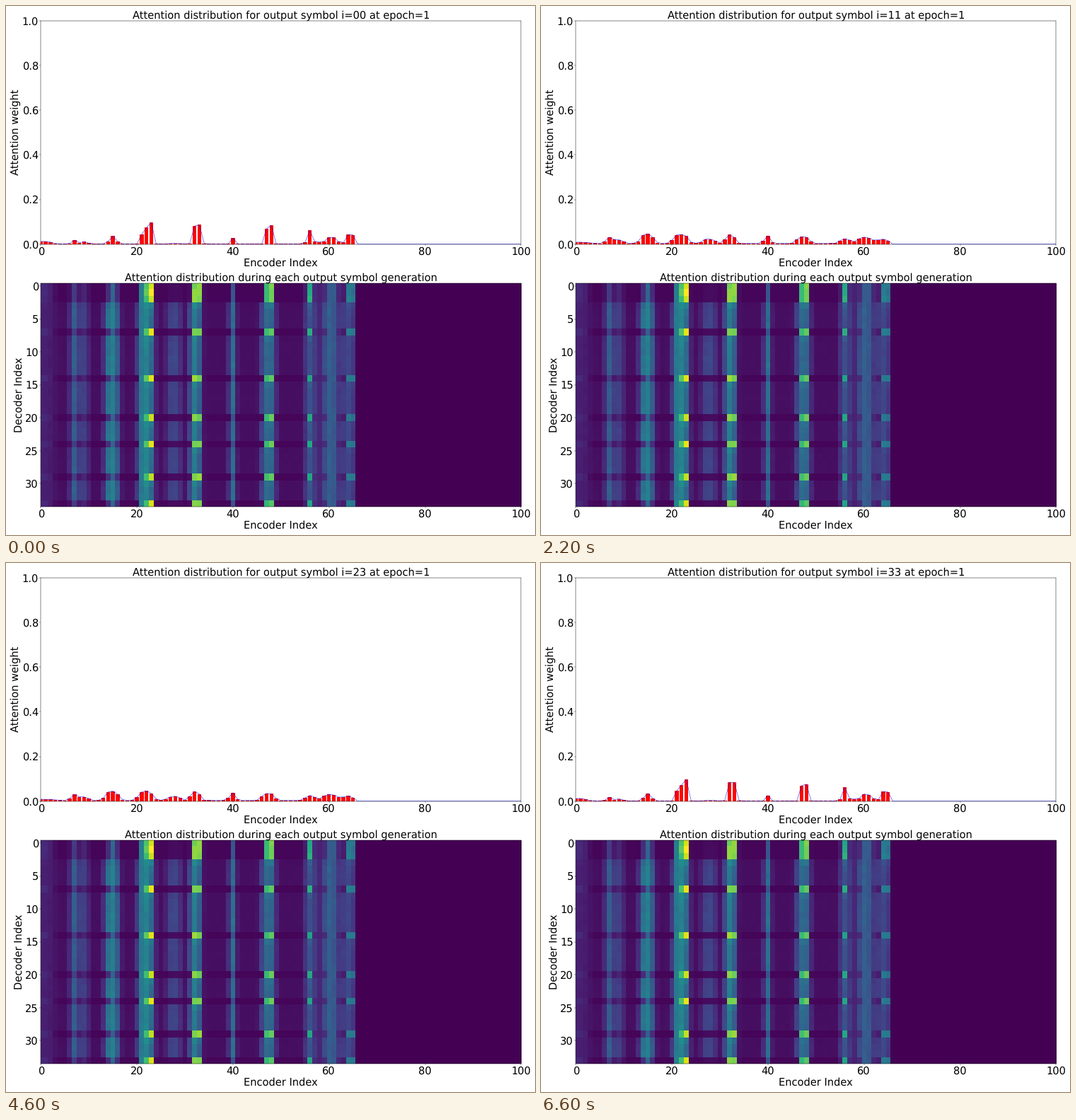
These frames come from a looping animation (748 by 748 pixels, 6800 ms). A matplotlib script:

```python
import numpy as np
import matplotlib.pyplot as plt
from matplotlib.animation import FuncAnimation

SIZE, DPI = 748, 34
ROWS, COLS, INPUT_LEN = 34, 101, 66
SHARP_ROWS = (0, 1, 2, 7, 14, 20, 24, 29, 33)

# Attention bumps: centre, height in thousandths, half width.
SMOOTH_BUMPS = [(0, 5, 3), (7, 27, 0.95), (9, 16, 1.1), (14.8, 41, 1.6),
                (21.8, 42, 1.75), (27.7, 18, 1.6), (32.1, 38, 1.25),
                (39.9, 34, 0.85), (47.3, 31, 1.55), (56, 20, 1.2),
                (60, 16, 1.4), (62, 13, 4.5), (64, 6, 1)]
SHARP_BUMPS = [(0.3, 11, 2.3), (7, 17, 0.8), (9, 9, 1), (15, 32, 1),
               (21.8, 72, 1), (23, 83, 0.6), (28, 2, 1.5), (32.5, 96, 0.95),
               (40, 25, 0.6), (47.55, 90, 0.85), (56, 60, 0.75),
               (60, 10, 3.5), (60.5, 20, 1.1), (64.5, 45, 0.95)]

plt.rcParams.update({
    "font.family": "DejaVu Sans",
    "font.size": 30.9,
    "axes.titlesize": 30.9,
    "axes.labelsize": 30.9,
    "text.hinting": "none",
    "axes.linewidth": 1.0,
})


def profile(bumps, floor):
    """Sum of flat-topped bumps over the input, zero in the padding."""
    x = np.arange(COLS)
    total = floor + sum(h * np.exp(-np.abs((x - c) / w) ** 3)
                        for c, h, w in bumps)
    return np.where(x < INPUT_LEN, total, 0) / 1000


def build_weights():
    sharp, smooth = profile(SHARP_BUMPS, 1.5), profile(SMOOTH_BUMPS, 4)
    rng = np.random.default_rng(4)
    rows, carry = [], 0
    for row in range(ROWS):
        # Focus appears at once and fades quickly over the next rows.
        if row in SHARP_ROWS:
            focus = 1
            carry = 0.5 * carry + 0.1
        else:
            focus = carry
            carry *= 0.3
        rows.append(smooth + focus * (sharp - smooth))
    return np.array(rows) * rng.normal(1, 0.03, (ROWS, COLS))


def add_panel(fig, top, bottom, ylabel):
    left, right = 49.3, 728.4
    ax = fig.add_axes([left / SIZE, 1 - bottom / SIZE,
                       (right - left) / SIZE, (bottom - top) / SIZE])
    ax.set_xlabel("Encoder Index")
    ax.set_ylabel(ylabel)
    return ax


weights = build_weights()
index = np.arange(COLS)

fig = plt.figure(figsize=(SIZE / DPI, SIZE / DPI), dpi=DPI, facecolor="white")

top_ax = add_panel(fig, 20.6, 336.8, "Attention weight")
bars = top_ax.bar(index, weights[0], width=0.8, color="red")
curve, = top_ax.plot(index, weights[0], color="blue", lw=1.0)
title = top_ax.set_title("")
top_ax.set(xlim=(0, 100), ylim=(0, 1), xticks=range(0, 101, 20),
           yticks=np.linspace(0, 1, 6))

map_ax = add_panel(fig, 391.6, 707.8, "Decoder Index")
map_ax.imshow(weights, cmap="viridis", aspect="auto", interpolation="nearest")
map_ax.set_title("Attention distribution during each output symbol generation")
map_ax.set(xlim=(0, 100), xticks=range(0, 101, 20), yticks=range(0, ROWS, 5))


def update(i):
    for bar, value in zip(bars, weights[i]):
        bar.set_height(value)
    curve.set_ydata(weights[i])
    title.set_text(
        f"Attention distribution for output symbol i={i:02d} at epoch=1")
    return [*bars, curve, title]


anim = FuncAnimation(fig, update, frames=ROWS, interval=200, repeat=True,
                     repeat_delay=0, blit=False)
plt.show()
```
